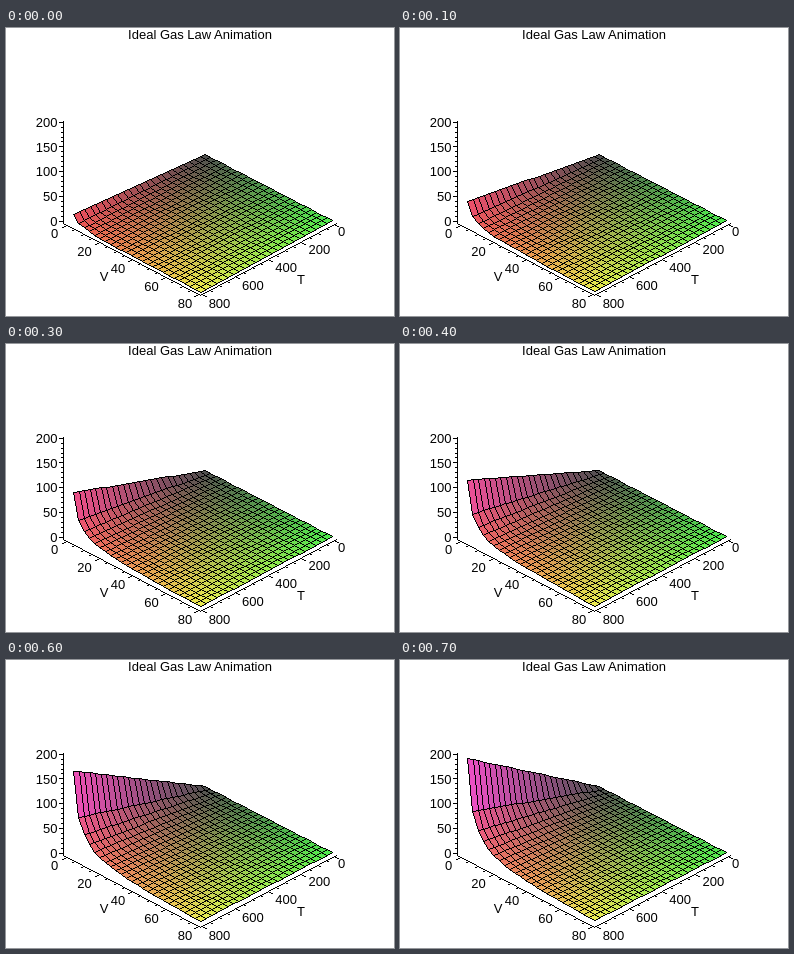
Animation of 388x288 px, one loop 800 ms. Source, as an HTML page with a canvas:

```html
<!DOCTYPE html>
<html lang="en">
<head>
<meta charset="utf-8">
<title>Ideal Gas Law Animation</title>
<style>
  html, body { margin: 0; width: 100%; height: 100%; overflow: hidden; background: #fff; }
  canvas, svg { position: absolute; left: 0; top: 0; }
  text { font: 13px "Liberation Sans", Arial, sans-serif; }
</style>
</head>
<body>
<canvas id="plot" width="388" height="288"></canvas>
<svg id="labels" width="388" height="288"></svg>
<script>
const ctx = document.getElementById('plot').getContext('2d');
const labels = document.getElementById('labels');
const CELLS = 24, V_MIN = 3.2, V_MAX = 80, STEPS = 8, STEP_MS = 100, PEAK = 100;

// Crisp one-pixel line
function line(x0, y0, x1, y1) {
  const n = Math.max(Math.abs(x1 - x0), Math.abs(y1 - y0), 1);
  for (let i = 0; i <= n; i++) {
    ctx.fillRect(Math.round(x0 + (x1 - x0) * i / n), Math.round(y0 + (y1 - y0) * i / n), 1, 1);
  }
}

function label(str, x, y, anchor = 'middle') {
  const el = document.createElementNS('http://www.w3.org/2000/svg', 'text');
  el.setAttribute('x', x);
  el.setAttribute('y', y);
  el.setAttribute('text-anchor', anchor);
  el.textContent = str;
  labels.append(el);
}

function drawLabels() {
  label('Ideal Gas Law Animation', 194, 11);
  for (let i = 0; i <= 4; i++) {
    label(i * 50, 51.5, Math.round(198 - i * 24.8), 'end');
    label(i * 20, i ? 45 + 33.5 * i : 48.5, Math.round(210 + 17.5 * i));
    label(800 - i * 200, i < 4 ? 213.5 + 33.3 * i : 335.5, Math.round(280 - 18 * i));
  }
  label('V', 98, 253);
  label('T', 295, 256);
}

function drawAxes() {
  ctx.fillStyle = '#000';
  line(57, 93, 57, 195);
  line(57, 195, 194, 267);
  line(194, 267, 330, 195);
  for (let i = 0; i <= 20; i++) {
    const y = Math.round(193 - i * 4.97);
    line(57 - (i % 5 ? 2 : 4), y, 57, y);
  }
  for (let i = 0; i <= 16; i++) {
    const len = i % 4 ? 2 : 4;
    const vx = Math.round(60 + i * 8.25), vy = Math.round(195 + (vx - 57) * 0.5255);
    line(vx, vy, vx - len, vy + len / 2);
    const tx = Math.round(196 + i * 8.25), ty = Math.round(267 - (tx - 194) * 0.529);
    line(tx, ty, tx + len, ty + len / 2);
  }
}

// u runs along V, w along T (0 to 1); height follows P = nRT/V
const pressure = (u, w, n) => n / STEPS * w * V_MIN / (V_MIN + (V_MAX - V_MIN) * u);

function project(i, j, n) {
  const u = i / CELLS, w = j / CELLS;
  return [
    Math.round(199 + 127 * u - 132 * w),
    Math.round(126 + 66 * u + 72 * w - PEAK * pressure(u, w, n))
  ];
}

const shade = f => Math.round(77 + 160 * f);

function drawSurface(n) {
  for (let i = 0; i < CELLS; i++) {
    for (let j = 0; j < CELLS; j++) {
      const quad = [[0, 0], [1, 0], [1, 1], [0, 1]].map(([a, b]) => project(i + a, j + b, n));
      const u = (i + 0.5) / CELLS, w = (j + 0.5) / CELLS;
      const p = (pressure(i / CELLS, w, n) + pressure((i + 1) / CELLS, w, n)) / 2;
      ctx.fillStyle = `rgb(${shade(w)},${shade(u)},${shade(p)})`;
      ctx.beginPath();
      quad.forEach(([x, y]) => ctx.lineTo(x + 0.5, y + 0.5));
      ctx.fill();
      ctx.fillStyle = '#000';
      quad.forEach((q, k) => line(...q, ...quad[(k + 1) % 4]));
    }
  }
}

let shown = 0;
function frame() {
  const n = Math.floor(performance.now() / STEP_MS) % STEPS + 1;
  if (n !== shown) {
    shown = n;
    ctx.fillStyle = '#fff';
    ctx.fillRect(0, 0, 388, 288);
    drawAxes();
    drawSurface(n);
  }
  requestAnimationFrame(frame);
}

drawLabels();
frame();
</script>
</body>
</html>
```
